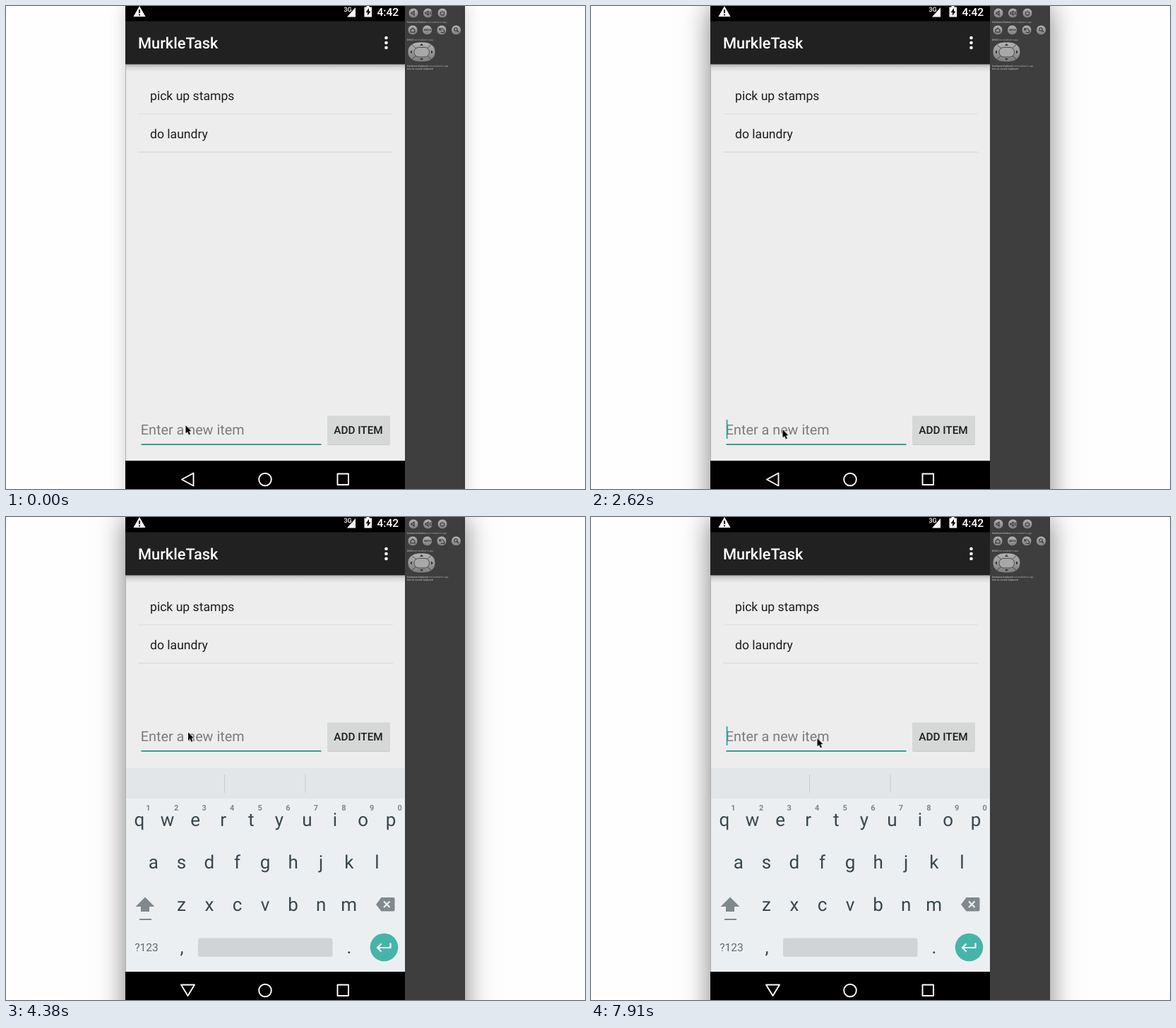
An HTML page that plays this animation: 820 by 683 pixels, repeating every 8 s.

```html
<!DOCTYPE html>
<html lang="en">
<head>
<meta charset="utf-8">
<title>To-do list</title>
<style>
html, body { margin: 0; width: 100%; height: 100%; overflow: hidden; background: #fefefe; }
.stage { position: relative; width: 100%; height: 100%; overflow: clip; contain: strict; }
.window { position: absolute; left: 169px; top: -14px; width: 481px; height: 860px; }
.idle { box-shadow: 0 12px 22px rgba(0,0,0,.2); animation: hide 8s step-end infinite; }
.active { box-shadow: 0 14px 36px rgba(0,0,0,.5); animation: show 8s step-end infinite; }
svg {
  position: absolute; left: 0; top: 0; width: 820px; height: 683px;
  font-family: Roboto, sans-serif; text-rendering: geometricPrecision;
}
.medium { font-weight: 500; }
.mid { text-anchor: middle; }
.tiny { font-size: 3.4px; fill: #aaa; }
.key { font-size: 26px; fill: #37474f; }
.digit { font-size: 11px; font-weight: 700; fill: #7d878c; }
.form { animation: lift 8s step-end infinite; }
.caret { animation: blink 8s step-end infinite; }
.keyboard { animation: keyboard 8s step-end infinite; }
.back { animation: hide-back 8s step-end infinite; }
.down { animation: show-down 8s step-end infinite; }
.mouse { animation: mouse 8s step-end infinite; }

@keyframes hide { 0% { opacity: 1 } 10.62%, 100% { opacity: 0 } }
@keyframes show { 0% { opacity: 0 } 10.62%, 100% { opacity: 1 } }
@keyframes hide-back { 0% { opacity: 1 } 40.62%, 100% { opacity: 0 } }
@keyframes show-down { 0% { opacity: 0 } 40.62%, 100% { opacity: 1 } }
@keyframes lift {
  0% { transform: translate(0, 0) }
  43.24%, 100% { transform: translate(0, -289px) }
}
@keyframes keyboard {
  0% { opacity: 0; transform: translate(0, 2px) }
  43.24% { opacity: .92; transform: translate(0, 2px) }
  45.74%, 100% { opacity: 1; transform: translate(0, 0) }
}
@keyframes blink {
  0%, 13.12%, 27.49%, 37.99%, 52.12%, 65.24%, 77.99%, 91.12% { opacity: 0 }
  7.87%, 19.74%, 32.74%, 45.74%, 59.99%, 72.74%, 85.87%, 98.87%, 100% { opacity: 1 }
}
@keyframes mouse {
  0% { transform: translate(253.5px, 592px) }
  2.62% { transform: translate(255.5px, 600px) }
  24.87% { transform: translate(268.5px, 599px) }
  27.49% { transform: translate(270.5px, 598px) }
  48.74% { transform: translate(265px, 559px) }
  52.12% { transform: translate(257px, 386px) }
  54.74% { transform: translate(257px, 303.5px) }
  57.37% { transform: translate(257px, 297px) }
  72.74% { transform: translate(319.5px, 309.5px) }
  98.87%, 100% { transform: translate(319.5px, 312px) }
}
</style>
</head>
<body>
<div class="stage">
<div class="window idle"></div>
<div class="window active"></div>
<svg viewBox="0 0 820 683">
  <defs>
    <linearGradient id="drop" x2="0" y2="1">
      <stop stop-opacity=".25"/><stop offset=".4" stop-opacity=".09"/><stop offset="1" stop-opacity="0"/>
    </linearGradient>
    <linearGradient id="metal" x2="0" y2="1">
      <stop stop-color="#b4b4b4"/><stop offset="1" stop-color="#7c7c7c"/>
    </linearGradient>
  </defs>

  <!-- side panel -->
  <path fill="#3e3e3e" d="M565 0h85v683h-85z"/>
  <path fill="#303030" d="M649 0h1v683h-1z"/>
  <g id="buttons" fill="url(#metal)" stroke="#2c2c2c" stroke-width=".7"></g>
  <g fill="none" stroke="#333" stroke-width="1.1">
    <path d="M574 9v2h2l2 2V7l-2 2zM594 9v2h2l2 2V7l-2 2zM600 8q2 2 0 4M602 7q3 3 0 6"/>
    <path d="M616.500 8a2.800 2.800 0 1 0 3 0M618 6.500v3"/>
    <path d="M573 34l3-3 3 3v3h-6zM614 34q3-5 6 0t-4 3M614 31v3h3"/>
    <circle cx="637" cy="33" r="2.200"/><path d="M638.500 34.500l2.500 2.500"/>
  </g>
  <text class="mid" x="597" y="35.300" font-size="3.600" font-weight="700" fill="#333">MENU</text>
  <g stroke="#2c2c2c" stroke-width=".7">
    <rect x="569" y="51" width="39" height="28" rx="16" ry="13" fill="url(#metal)"/>
    <path d="M575 55l6 5M602 55l-6 5M575 75l6-5M602 75l-6-5"/>
    <rect x="578" y="58.500" width="21.500" height="13.500" rx="6.500" fill="#a8a8a8"/>
  </g>
  <path fill="#333" d="M586 56h5l-2.500-3zM586 74h5l-2.500 3zM575 62.500v5l-3-2.500zM602 62.500v5l3-2.500z"/>
  <g class="tiny">
    <text x="568" y="23.500"><tspan font-weight="700">Hardware Buttons</tspan> not enabled in app</text>
    <text x="568" y="48.500"><tspan font-weight="700">DPAD</tspan> not enabled in app</text>
    <text x="568" y="86"><tspan font-weight="700">Hardware Keyboard</tspan> not enabled in app</text>
    <text x="568" y="90" font-weight="700">Use on-screen keyboard</text>
  </g>

  <!-- app screen -->
  <path fill="#ededed" d="M169 0h396v683H169z"/>
  <path fill="url(#drop)" d="M169 82.500h396v11H169z"/>
  <path fill="#212121" d="M169 21h396v61.500H169z"/>
  <path d="M169 0h396v21.500H169zM169 643h396v40H169z"/>

  <g fill="#fff">
    <path d="M189 0l8.500 15h-17z"/>
    <path fill="#000" d="M188 5h2v5h-2zM188 11.500h2v2h-2z"/>
    <text class="medium" x="478.500" y="7.500" font-size="9">3G</text>
    <path d="M495 2v13.500h-12z"/>
    <path d="M507.500 1.500h3V0h4v1.500h3.500v14h-10.500z"/>
    <path fill="#000" d="M514 3l-4.500 6h2.500v4.500l4.500-6H514z"/>
    <text class="medium" x="525.500" y="13.500" font-size="15.600">4:42</text>
    <text class="medium" x="187" y="60" font-size="21.800">MurkleTask</text>
    <circle cx="538.500" cy="45" r="2.300"/><circle cx="538.500" cy="52" r="2.300"/><circle cx="538.500" cy="59" r="2.300"/>
  </g>

  <g font-size="17.600" fill="#1c1c1c">
    <text x="204" y="133">pick up stamps</text>
    <text x="204" y="186.500">do laundry</text>
  </g>
  <path fill="#dedede" d="M187 152h361v1H187z"/>
  <path fill="#d6d6d6" d="M187 206h361v1H187z"/>

  <g class="form">
    <text x="190.800" y="606" font-size="19.800" fill="#7c7c7c">Enter a new item</text>
    <path fill="#3f9b91" d="M191.500 619h255v2h-255z"/>
    <path class="caret" fill="#26a69a" d="M191.700 585h1.800v27h-1.800z"/>
    <rect x="455" y="580" width="89" height="41" rx="2" fill="#c9caca"/>
    <rect x="455" y="579.500" width="89" height="40.500" rx="2" fill="#d6d7d7"/>
    <text class="mid medium" x="499" y="605" font-size="15.300" fill="#1c1c1c">ADD ITEM</text>
  </g>

  <g fill="none" stroke="#fff" stroke-width="1.900" stroke-linejoin="round">
    <path class="back" d="M249 669.500l16.500-9v18z"/>
    <path class="down" d="M248 661.500h19l-9.500 15.500z"/>
    <circle cx="367" cy="669.500" r="8.800"/>
    <path d="M469.500 661.500h15.500v15.500h-15.500z"/>
  </g>

  <g class="keyboard">
    <path fill="#eceff1" d="M169 355h396v288H169z"/>
    <path fill="#e2e6e9" d="M169 355h396v43H169z"/>
    <path fill="#c6cbce" d="M309 364h1v26h-1zM423.500 364h1v26h-1z"/>
    <g id="keys" class="mid"></g>
    <g fill="#7f898e">
      <path d="M197 537.500l13.500 13.500h-7.500v7h-12v-7h-7.500zM189 568h17v2h-17z"/>
      <path d="M524 548l7.500-10h17q2 0 2 2v15.500q0 2-2 2h-17z"/>
    </g>
    <path fill="none" stroke="#eceff1" stroke-width="2.200" d="M535 543.500l8.500 8.500M543.500 543.500l-8.500 8.500"/>
    <text class="mid" x="199" y="614" font-size="15.500" fill="#606c72">?123</text>
    <rect x="272" y="595.500" width="190.500" height="26.500" rx="3" fill="#d0d4d7"/>
    <circle cx="535.500" cy="608.500" r="19.800" fill="#45b5aa"/>
    <path fill="none" stroke="#fff" stroke-width="2.200" d="M544.500 602.500v6.500h-18M531.500 603.500l-5.500 5.500 5.500 5.500"/>
  </g>
  <path fill="#b0b0b0" d="M169 83h1v560h-1z"/>

  <path class="mouse" stroke="#fff" stroke-width="1.200" paint-order="stroke" d="M1 1v11.500l2.600-2.400 1.900 4.300 2-.9-1.900-4.200H9z"/>
</svg>
</div>
<script>
const NS = 'http://www.w3.org/2000/svg';

function add(parent, tag, attrs, text = '') {
  const el = document.createElementNS(NS, tag);
  for (const name in attrs) el.setAttribute(name, attrs[name]);
  el.textContent = text;
  document.getElementById(parent).append(el);
}

const label = (x, y, text, cls = 'key') => add('keys', 'text', { x, y, class: cls }, text);

const pitch = 39.57;
const rows = [['qwertyuiop', 0], ['asdfghjkl', .5], ['zxcvbnm', 1.5]];
rows.forEach(([letters, indent], row) => {
  [...letters].forEach((c, i) => label(189 + (indent + i) * pitch, 437 + row * 60, c));
});
for (let i = 0; i < 10; i++) label(201.5 + i * pitch, 415, (i + 1) % 10, 'digit');
label(249, 616.5, ',');
label(486, 616.5, '.');

[[577, 10, 3], [576, 34, 4]].forEach(([x, cy, count]) => {
  for (let i = 0; i < count; i++) add('buttons', 'circle', { cx: x + i * 20.5, cy, r: 7 });
});
</script>
</body>
</html>
```
